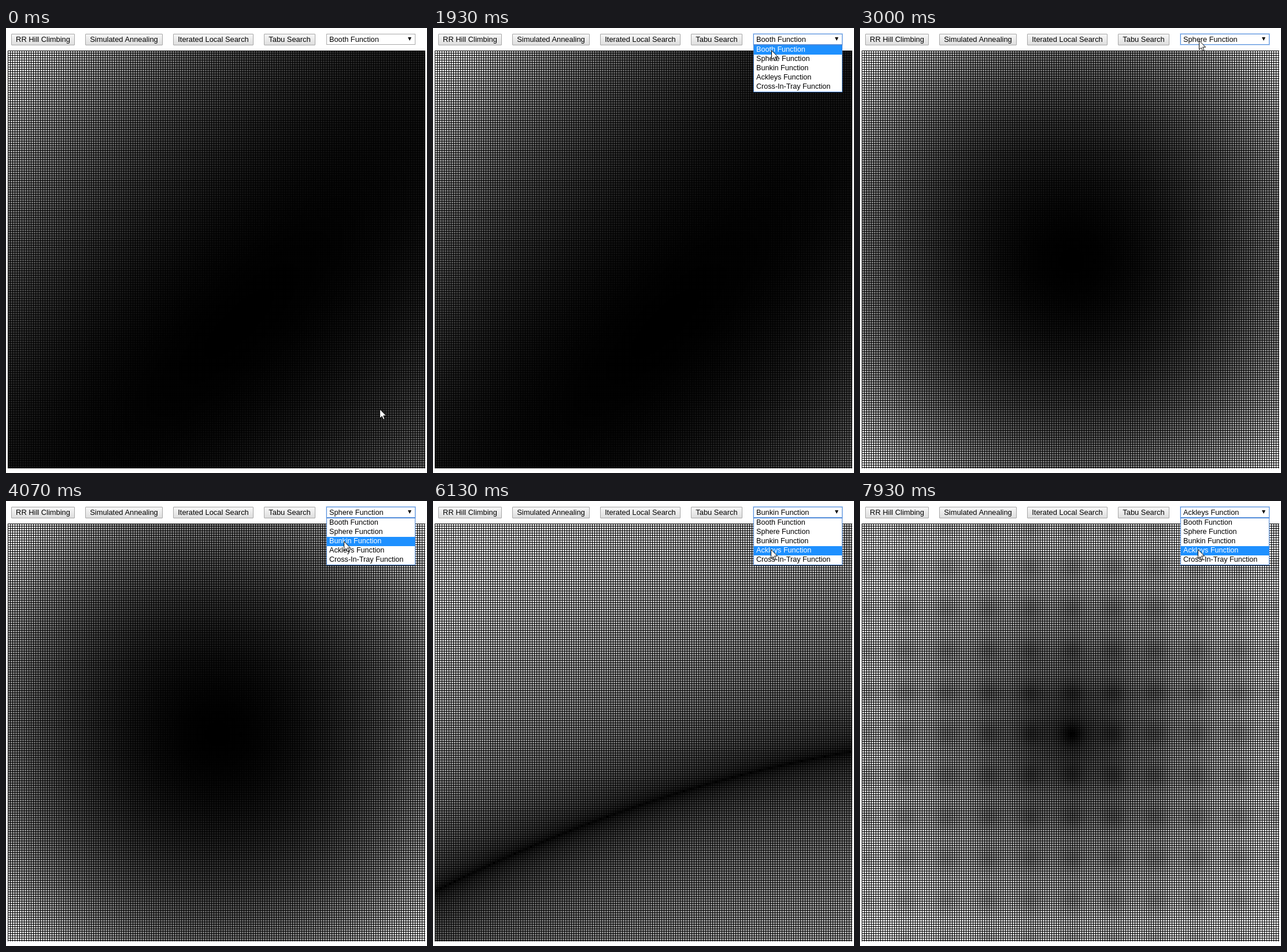
Recreate the animation shown at these times as an HTML page with a canvas. Size 728 by 769 pixels, loop 8 s.

```html
<!DOCTYPE html>
<html lang="en">
<head>
<meta charset="utf-8">
<title>Search functions</title>
<style>
html, body { margin: 0; width: 100%; height: 100%; overflow: hidden; background: #fff; }
body { position: relative; font: 12.9px/18px "Liberation Sans", Arial, sans-serif; color: #000; }
canvas, .btn, #pick, #list, #mouse { position: absolute; box-sizing: border-box; white-space: nowrap; }
canvas { left: 3px; top: 39px; }
.btn { top: 10px; height: 20px; border: 1px solid #a6a6a6; border-radius: 1px; text-align: center;
  background: linear-gradient(#f7f7f7, #dedede); }
#pick { left: 554px; top: 10px; width: 154px; height: 19px; border: 1px solid #a9a9a9;
  padding-left: 4px; background: #fff; font-size: 12.75px; }
#pick.on { border-color: #5a92dc; box-shadow: 0 0 0 1px #c5dbf7; }
#pick::after { content: ""; position: absolute; right: 6px; top: 5px;
  border: solid transparent; border-width: 6px 3.5px 0; border-top-color: #000; }
#list { left: 554px; top: 29px; width: 154px; height: 82px; border: 1px solid #4a86d8; background: #fff;
  font-size: 12.6px; line-height: 15px; }
#list div { height: 16px; padding-left: 4px; }
#list .hi { background: #1e90ff; color: #fff; }
#mouse { left: 0; top: 0; }
</style>
</head>
<body>
<div class="btn" style="left:9px;width:110px">RR Hill Climbing</div>
<div class="btn" style="left:137px;width:134px">Simulated Annealing</div>
<div class="btn" style="left:289px;width:139px">Iterated Local Search</div>
<div class="btn" style="left:446px;width:89px">Tabu Search</div>
<div id="pick"></div>
<div id="list"></div>
<svg id="mouse" width="13" height="20" viewBox="0 0 13 20">
  <path d="M.5 .8V16.5L4.1 13.1L6.5 18.6L9 17.5L6.6 12.1H11.6Z" fill="#fff" stroke="#000"/>
</svg>
<script>
const { PI, E, abs, sqrt, exp, cos, floor, round, min, max } = Math;
const SIZE = 722, CELL = 4, RATE = 15, LOOP = 8000;

const names = ["Booth", "Sphere", "Bunkin", "Ackleys", "Cross-In-Tray"].map(n => n + " Function");

// Arguments run from -1 to 1 across the field
const fields = [
  (u, v) => (10 * u + 20 * v - 7) ** 2 + (20 * u + 10 * v - 5) ** 2,
  (u, v) => u * u + v * v,
  (u, v) => sqrt(abs(3 * v - (u - 2) ** 2 / 4)),
  (u, v) => 20 + E - 20 * exp(-sqrt((u * u + v * v) / 2))
    - exp((cos(10 * PI * u) + cos(10 * PI * v)) / 2)
];

function paint(f) {
  const canvas = document.createElement("canvas");
  canvas.width = canvas.height = SIZE;
  const c = canvas.getContext("2d");
  const cells = [];
  for (let x = 0; x < SIZE; x += CELL)
    for (let y = 0; y < SIZE; y += CELL)
      cells.push([x, y, f(2 * x / SIZE - 1, 2 * y / SIZE - 1)]);
  const top = cells.reduce((m, cell) => max(m, cell[2]), 0);
  c.fillRect(0, 0, SIZE, SIZE);
  for (const [x, y, value] of cells) {
    const g = round(255 * value / top);
    c.fillStyle = `rgb(${g},${g},${g})`;
    c.fillRect(x + 1, y + 1, CELL - 1, CELL - 1);
  }
  document.body.prepend(canvas);
  return canvas;
}

const ROW_TOP = 30, ROW = 16, BOX = [586, 21];
const rowSpot = n => [584, 41 + 14 * n];

// Each visit, in ticks: open the list, reach the row, commit the choice
const visits = [
  { open: 24, move: 27, reach: 31, commit: 45, row: 1 },
  { open: 49, move: 50, reach: 61, commit: 74, row: 2 },
  { open: 81, move: 82, reach: 92, commit: 106, row: 3 },
  { open: 114, move: 115, reach: 119, commit: 120, row: 3 }
];

const mix = (a, b, u) => a.map((p, i) => p + (b[i] - p) * u);
const span = (k, a, b) => min(1, max(0, (k - a) / (b - a)));

// First sweep bows to the right on its way up to the box
function arrive(k) {
  const u = span(k, 1, 15), bow = [790, 230];
  return mix(mix([646, 658], bow, u), mix(bow, [583, 30], u), u);
}

function pointer(k) {
  const n = visits.findIndex(v => k < v.commit), v = visits[n];
  const from = n ? rowSpot(visits[n - 1].row) : arrive(k);
  const left = n > 1 ? visits[n - 1].commit : n ? 34 : 21;
  const up = n === 1 ? 42 : v.open - 2;
  if (n === 0 && k >= 34) return mix(rowSpot(1), BOX, span(k, 34, 42));
  if (n === 1) return k < v.move ? BOX : mix(BOX, rowSpot(2), span(k, v.move, v.reach));
  if (k < v.move) return mix(from, BOX, span(k, left, up));
  return mix(BOX, rowSpot(v.row), span(k, v.move, v.reach));
}

const el = id => document.getElementById(id);
const pick = el("pick"), list = el("list"), mouse = el("mouse");
const rows = names.map(text => {
  const row = document.createElement("div");
  row.textContent = text;
  return list.appendChild(row);
});
const layers = fields.map(paint);
let last = -1;

function draw(now) {
  const k = floor((now % LOOP + 5) * RATE / 1000) % (LOOP * RATE / 1000);
  if (k === last) return;
  last = k;
  const n = visits.findIndex(v => k < v.commit), v = visits[n];
  const field = n ? visits[n - 1].row : 0;
  const [x, y] = pointer(k).map(round);
  const hover = y < ROW_TOP ? field : floor((y - ROW_TOP) / ROW);
  const hi = k >= v.reach ? v.row : hover;
  layers.forEach((l, i) => l.style.visibility = i === field ? "visible" : "hidden");
  rows.forEach((r, i) => r.className = i === hi ? "hi" : "");
  pick.textContent = names[field];
  pick.className = k >= 22 ? "on" : "";
  list.style.visibility = k >= v.open ? "visible" : "hidden";
  mouse.style.transform = `translate(${x}px,${y}px)`;
}

const start = performance.now();
function loop() {
  draw(performance.now() - start);
  requestAnimationFrame(loop);
}
loop();
</script>
</body>
</html>
```
